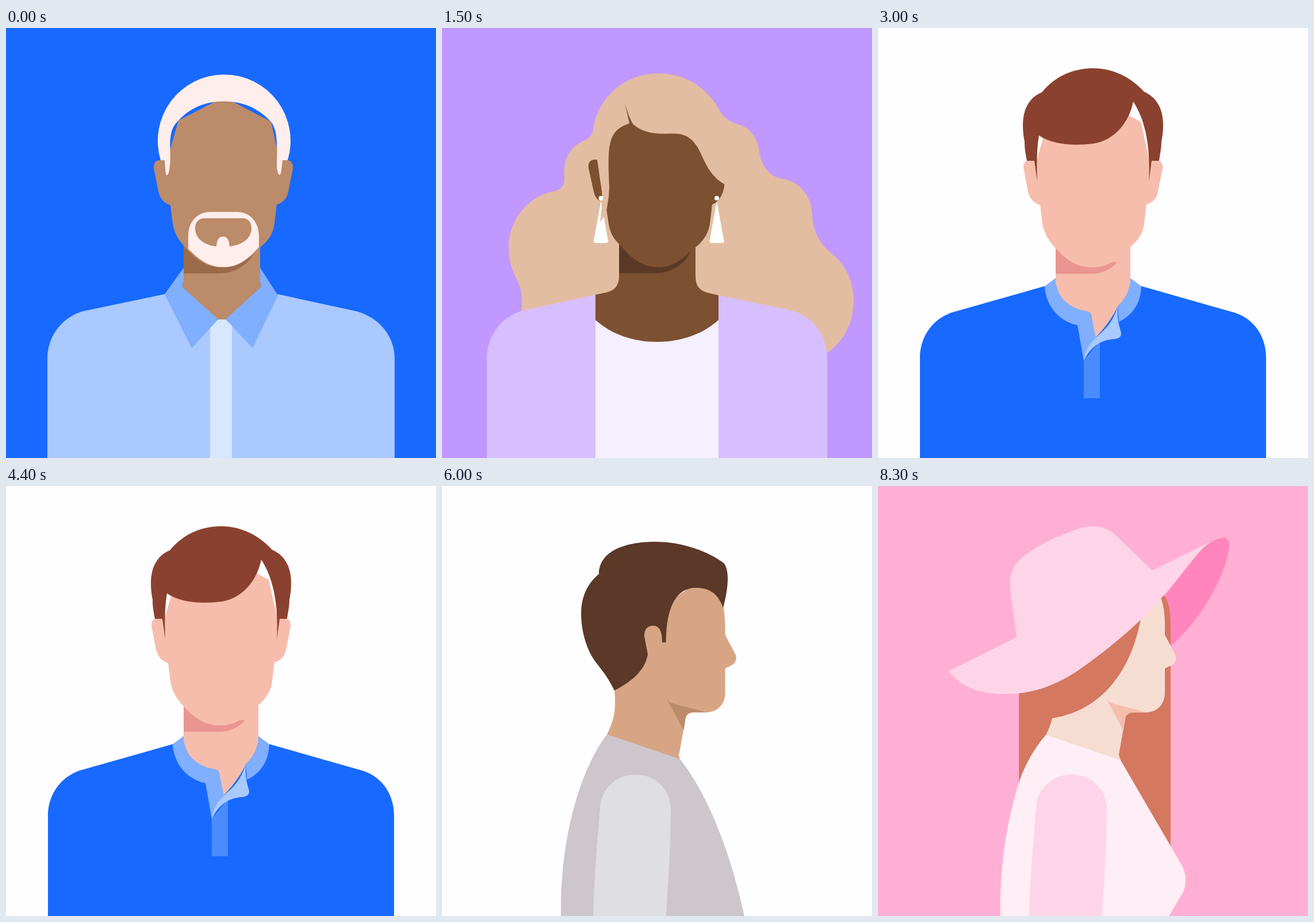
An HTML page without scripts that plays this animation: 748x748 px, repeating every 9200 ms.

```html
<!DOCTYPE html>
<html lang="en">
<head>
<meta charset="utf-8">
<title>Portraits</title>
<style>
html, body { margin: 0; height: 100%; overflow: hidden; }
svg { display: block; width: 100%; height: 100%; }

/* Each portrait shows for 1.5 s; the last one lies below and fills the rest. */
.cut {
  visibility: hidden;
  animation: cut 9.2s step-end calc(var(--i) * 1.5s) infinite;
}
@keyframes cut {
  0% { visibility: visible; }
  16.3043%, 100% { visibility: hidden; }
}
</style>
</head>
<body>
<svg viewBox="0 0 748 748">
  <defs>
    <rect id="bg" width="748" height="748"/>
    <path id="head" d="M280 230H268Q257 230 257 243L265 284C268 297 275 305 286 308L290 340C293 358 301 370 313 383C333 405 350 416.500 378 416.500C402 416.500 422 403 443 381C457 369 465 357 467 340L471 307C482 304 489 296 491 285L499 245Q500 230 488 230H476L461 163L379 120L300 161Z"/>
    <path id="profile" d="M470 235H499V259L517 293C520 301 517 309 510 312L499 317.500V360C499 380 485 394 465 394H444C436 394 431 398 430 405L419 467L400 455L410 400Z"/>
    <path id="jaw" d="M396 368L427 425L430 405C431 398 436 393.500 444 393.500H465L406 377.500Q400 375 396 368Z"/>
    <path id="arm" d="M263 748C264 690 270 620 275 560C277 525 304 502 337 502C372 502 398 528 398 563C398 630 393 690 390 748Z"/>
    <path id="drop" d="M0 2L-12.500 71Q-13 75 -9 75H9Q13 75 12.500 71Z"/>
  </defs>

  <!-- woman with hat -->
  <g>
    <use href="#bg" fill="#ffafd4"/>
    <path fill="#ff85bc" d="M480 215L560 112C578 95 595 89 603 90C612 92 612 103 610 113C600 165 560 235 509 278Z"/>
    <path fill="#d47860" d="M245 300L490 185C504 190 509 215 509 240V640H245Z"/>
    <g fill="#f6ddd2">
      <path d="M292 433Q299 420 303 404C370 394 435 345 457 232L492 195Q499 212 499 240V250L430 380L415 455L422 477L400 500Z"/>
      <use href="#profile"/>
    </g>
    <use href="#jaw" fill="#f6bdac"/>
    <path fill="#ffeef5" d="M213 748C211 660 224 585 245 516C257 482 272 456 292 433L422 477L528 659C537 675 537 693 530 708L506 748Z"/>
    <path id="hat" fill="#fdd4e8" d="M123 322L241 263L230 178C227 155 235 140 247 128C270 106 305 90 345 76C372 66 395 69 413 85L477 147L583 95C560 106 540 142 492 196C455 239 400 285 345 323C300 352 262 362 220 362C175 362 142 348 123 322Z"/>
    <use href="#arm" fill="#fdd4e8"/>
  </g>

  <!-- man with goatee -->
  <g class="cut" style="--i:0">
    <use href="#bg" fill="#1869ff"/>
    <path fill="#aac9ff" d="M72 748V575C72 535 99 501 137 492L276 463H473L606 492C647 501 676 535 676 575V748Z"/>
    <path fill="#bc8b69" d="M309 370V440L306 450L368 508H382L444 450L442 440V370Z"/>
    <path fill="#9b6a49" d="M309 376V427H370C400 427 424 410 432 388Z"/>
    <path fill="#80afff" d="M309 417L276 463L323 557L369 507L306 450L309 440ZM442 417L473 465L429 557L382 507L444 450L442 440Z"/>
    <path fill="#d7e7ff" d="M369 507H382L393 518V748H355V522Z"/>
    <use href="#head" fill="#bc8b69"/>
    <path fill="#ffeeec" d="M269 230A115.500 115.500 0 1 1 490 230H481L479 247C478 258 474 258 472 248C470 238 472 225 471.500 212C471 190 470 175 461 163C438 139 412 127.500 379 127.500C347 127.500 320 139 300 161C288 172 285 185 285.500 212C286 225 286 235 284 247C282 258 278 259 277.500 250L276 230Z"/>
    <path fill="#ffeeec" fill-rule="evenodd" d="M317 384V362C317 337 333 320 355 320H402C424 320 440 337 440 362V381C419 405 402 416 378 416C353 416 337 404 317 384ZM345 331H412C421 331 427 338 427 348C427 368 408 378 389 380C388 370 386 363 377.500 363C369 363 367 370 366 380C346 378 329 367 329 348C329 337 336 331 345 331Z"/>
  </g>

  <!-- woman with earrings -->
  <g class="cut" style="--i:1">
    <use href="#bg" fill="#c198ff"/>
    <path fill="#e3bda1" d="M138 493C141 470 138 452 130 437C120 418 116 400 116 382C116 330 155 290 195 284C207 282 213 274 213 262C210 230 221 207 247 196C257 191 262 185 263 175C272 120 318 79 377 79C425 79 462 106 481 140C488 154 497 162 513 167C538 174 548 190 552 215C555 240 570 258 590 262C625 267 643 295 644 325C645 355 658 375 675 390C703 412 716 440 716 475C716 510 700 545 669 566L374 600Z"/>
    <path fill="#7b5131" d="M308 370V432C308 448 300 457 286 460L267 464V560H481V465L460 460C447 456 441 447 441 432V370Z"/>
    <path fill="#5c3827" d="M308 376V426.500H373C400 426 424 410 431 389Z"/>
    <path fill="#d7beff" d="M78 748V575C78 535 104 501 142 491L267 464V748ZM481 748V465L606 491C645 501 670 535 670 575V748Z"/>
    <path fill="#f6efff" d="M267 508C295 533 333 546 374 546C415 546 453 533 481 508V748H267Z"/>
    <path fill="#7b5131" d="M270 229H264Q253 231 255 244L264 285Q266 295 273 300L280 298ZM318 130L326 166C300 174 291 190 290 222C288 258 295 282 286 314L290 342C294 362 302 370 313 381C333 404 350 416 377 416C398 416 414 407 433 387C446 379 463 364 466 340L470 307C482 303 490 288 491.500 272C470 260 460 240 452 222C442 199 430 185 408 184C385 183 358 188 333 168C326 158 322 143 318 130Z"/>
    <g fill="#fff">
      <use href="#drop" x="276.500" y="299"/>
      <use href="#drop" x="478" y="299"/>
    </g>
    <path fill="#e3bda1" d="M276 250L279 298L275 338Q284 327 287 313L291 275Z"/>
    <g fill="#fff">
      <circle cx="276.500" cy="296" r="4"/>
      <circle cx="478" cy="296" r="4"/>
    </g>
  </g>

  <!-- man with fringe -->
  <g class="cut" style="--i:2">
    <use href="#bg" fill="#fefdff"/>
    <path fill="#1869ff" d="M73 748V573C73 535 98 502 135 493L290 449H458L616 494C652 503 675 535 675 573V748Z"/>
    <path fill="#f7bdac" d="M309 370V435C309 465 328 486 358 492C366 493 369 494 371 500L378 539C398 518 410 500 417 484C432 470 439 455 439 435V370Z"/>
    <path fill="#ea9591" d="M309 380V427.500H374C392 427 406 418 416 408L374 400Z"/>
    <path fill="#80afff" d="M309 435L290 449C292 484 315 510 347 517L358 579L379 539L371 500C369 494 366 493 358 492C328 485 309 465 309 435ZM439 435L458 449C457 480 442 500 419 511L417 484C432 470 439 455 439 435Z"/>
    <path fill="#4a8cff" d="M358 579V644H386V544Z"/>
    <path fill="#a9caff" d="M417 484C410 508 398 522 384 534C369 547 359 562 358 579C372 550 392 542 412 541C421 540 425 535 422 527C417 510 416 500 417 484Z"/>
    <use href="#head" x="-4" fill="#f7bdac"/>
    <path fill="#8b412f" d="M259 231C256 215 255 208 255 198C250 172 251 150 260 134C267 122 275 116 285 112C306 86 337 70 374 70C411 70 441 87 463 111C484 120 496 140 496 168C496 180 495 187 493 198C493 210 490 222 489 231H476L471 268C474 215 468 165 444 128C437 165 410 196 375 201C345 205 305 204 280 187C276 210 276 240 277 267L272 231Z"/>
  </g>

  <!-- woman with black hair -->
  <g class="cut" style="--i:3">
    <use href="#bg" fill="#d7beff"/>
    <path d="M225 584C210 545 191 495 191 450C191 395 225 365 226 312C226 290 222 280 222 248C222 165 280 105 360 108C395 94 435 94 465 106C483 114 490 128 489 146C515 158 532 195 533 245L534 405C534 470 505 522 459 540Z"/>
    <g fill="#8b412f">
      <path d="M322 475C345 457 365 440 370 415C376 385 375 350 374 314C368 309 366 303 364 293L358 262C358 250 365 243 374 243C388 243 392 262 402 262C408 262 407 250 408 240C413 205 455 202 480 173C492 190 499 210 499 235V250L430 380L415 455L419 467L448 522L400 525Z"/>
      <use href="#profile"/>
    </g>
    <use href="#jaw" fill="#6b3522"/>
    <path fill="#ac73ff" d="M213 748C213 690 216 630 225 584C250 545 280 508 322 475Q384 500 448 522L528 659C537 675 537 693 530 708L506 748Z"/>
    <use href="#arm" fill="#c198ff"/>
  </g>

  <!-- man in profile -->
  <g class="cut" style="--i:4">
    <use href="#bg" fill="#fefdff"/>
    <g fill="#d7a583">
      <path d="M287 432C300 408 303 385 300 356L340 240L440 170Q475 172 489 208Q492 220 492 240V250L423 380L408 455L414 476L400 500Z"/>
      <use href="#profile" x="-6.500"/>
    </g>
    <use href="#jaw" x="-6.500" fill="#bc8b69"/>
    <path fill="#5b3828" d="M300 356C287 328 272 314 263 300C250 280 242 250 242 222C242 190 255 168 273 153C273 115 315 97 371 97C420 97 465 115 490 134C500 145 499 175 489 212C480 185 462 177 442 177C405 177 390 215 389.500 272H383C383 254 379 243 367 243C357 243 351 251 352 262L358 293C352 325 325 342 300 356Z"/>
    <path fill="#cdc6cd" d="M207 748C204 630 235 500 287 432L414 475C465 540 502 640 526 748Z"/>
    <use href="#arm" fill="#dedee3"/>
  </g>
</svg>
</body>
</html>
```
